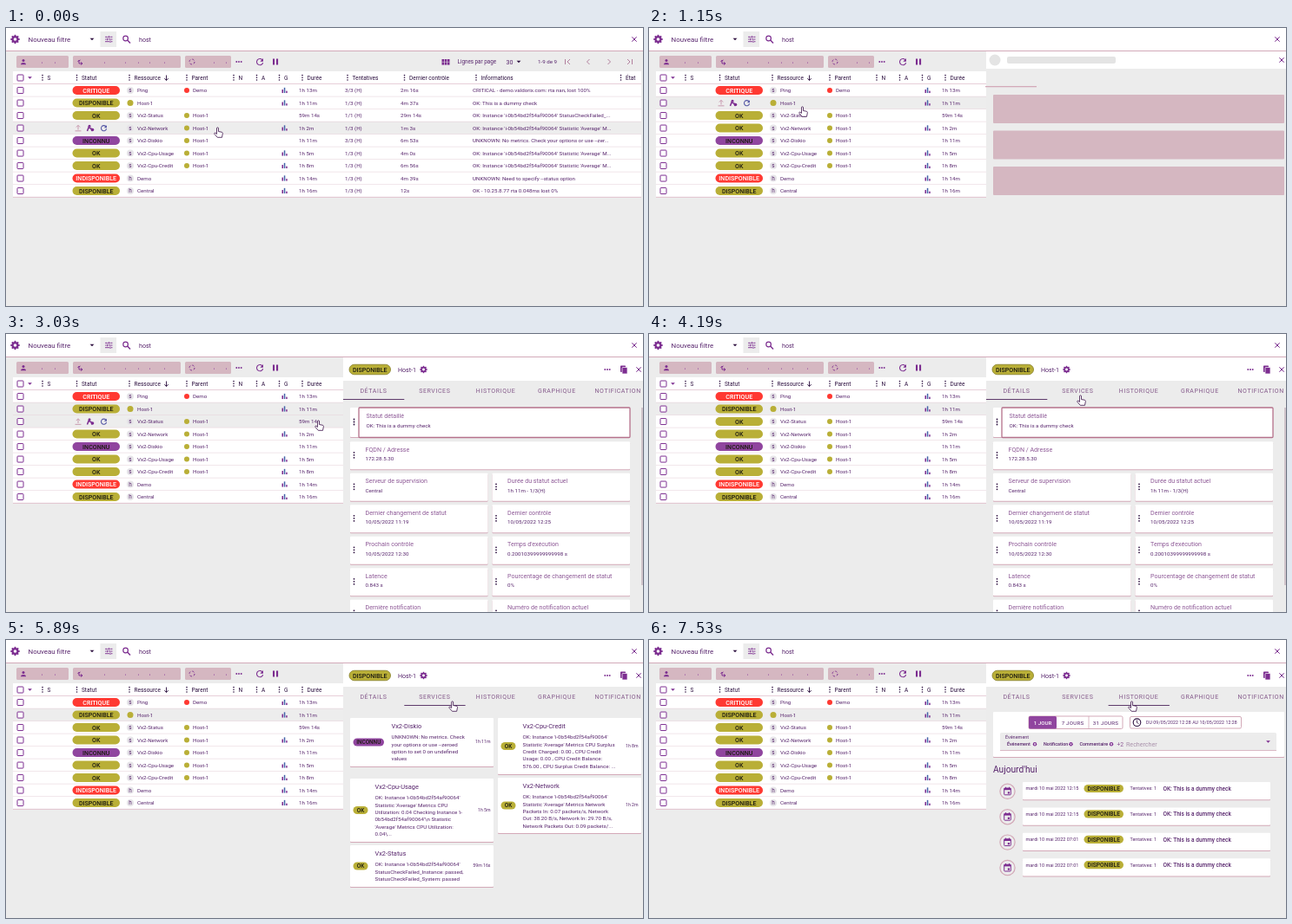
Animation of 733 by 321 pixels, one loop 8000 ms. Source, as an HTML page:

```html
<!DOCTYPE html>
<html lang="fr">
<head>
<meta charset="utf-8">
<title>Supervision</title>
<style>
html, body { margin: 0; width: 100%; height: 100%; overflow: hidden; background: #ececec; }
svg { display: block; width: 100%; height: 100%; font-family: Roboto, Arial, sans-serif; }
text { white-space: pre; }
</style>
</head>
<body>
<svg id="stage" viewBox="0 0 733 321"></svg>
<script>
const INK = '#57246c', DARK = '#2c0f3f', PURPLE = '#7c2d90', VIOLET = '#90459f', SOFT = '#8d5896';
const PINK = '#d5b7c1', LINE = '#d3a9b8', OLIVE = '#b9af37', RED = '#ff3932', GREY = '#ececec', BLACK = '#1c1a10';
const LOOP = 8000, ROW_TOP = 64.8, ROW_H = 14.5, PANEL_X = 388, TAB_W = 70.3;

const esc = s => s.replace(/&/g, '&amp;').replace(/</g, '&lt;');
const text = (x, y, s, size = 6.2, fill = INK, extra = '') =>
  `<text x="${x}" y="${y + size * .355}" font-size="${size}" fill="${fill}" ${extra}>${esc(s)}</text>`;
const mid = (x, y, s, size, fill, extra = '') => text(x, y, s, size, fill, 'text-anchor="middle" ' + extra);
const rect = (x, y, w, h, fill, extra = '') =>
  `<rect x="${x}" y="${y}" width="${w}" height="${h}" fill="${fill}" ${extra}/>`;
const dot = (x, y, r, fill, extra = '') => `<circle cx="${x}" cy="${y}" r="${r}" fill="${fill}" ${extra}/>`;
const path = (d, stroke = PURPLE, w = 1, fill = 'none') =>
  `<path d="${d}" fill="${fill}" stroke="${stroke}" stroke-width="${w}"/>`;
const group = (id, body) => `<g id="${id}">${body}</g>`;
const many = (n, f) => Array.from({ length: n }, (_, i) => f(i)).join('');

// Small icons
const kebab = (x, y, r = .8, gap = 2.7) => many(3, i => dot(x, y + (i - 1) * gap, r, DARK));
const dots = (x, y) => many(3, i => dot(x + (i - 1) * 2.7, y, .95, PURPLE));
const cross = (x, y, r = 2.7, c = PURPLE) => path(`M${x - r} ${y - r}l${2 * r} ${2 * r}m0 ${-2 * r}l${-2 * r} ${2 * r}`, c);
const caret = (x, y, fill = DARK) => path(`M${x - 2.4} ${y - 1.2}h4.8l-2.4 2.5z`, 'none', 0, fill);
const gear = (x, y, r) => dot(x, y, r * .56, 'none', `stroke="${PURPLE}" stroke-width="${r * .42}"`) +
  many(8, i => rect(x - r * .18, y - r, r * .36, r * .4, PURPLE, `transform="rotate(${i * 45} ${x} ${y})"`));
const reload = (x, y, r, c = PURPLE) =>
  path(`M${x + r * .8} ${y - r * .6}A${r} ${r} 0 1 0 ${x + r} ${y + r * .3}`, c, 1.1) +
  path(`M${x + r * 1.1} ${y - r * 1.1}v${r}h${-r}z`, 'none', 0, c);
const bars = (x, y) => rect(x - 3, y - 1, 1.5, 4, PURPLE) + rect(x - .7, y - 3.2, 1.5, 6.2, '#4462a8') + rect(x + 1.7, y + .6, 1.5, 2.4, PURPLE);
const box = (x, y) => rect(x - 3.5, y - 3.5, 7, 7, '#fff', `rx=".8" stroke="${PURPLE}"`);
const pill = (x, y, w, h, s, fill, size, color = BLACK, extra = '') =>
  rect(x, y - h / 2, w, h, fill, `rx="${h / 2}" ${extra}`) + mid(x + w / 2, y, s, size, color, 'font-weight="500"');
const card = (x, y, w, h) => rect(x, y + 1, w, h, LINE, 'rx="1"') + rect(x, y, w, h, '#fff', 'rx="1"');
const blocks = y => many(3, i => rect(396, y + i * 41.5, 335, 33, PINK, 'rx="1"'));

function chrome() {
  const buttons = [[12, 60, [41, 56]], [77, 124, [113, 137, 152, 165, 182]], [206, 53, [239, 253]]];
  return rect(0, 0, 733, 321, GREY) + rect(0, 0, 733, 26, '#fff') + gear(10.5, 13, 5.2) +
    text(25.5, 13, 'Nouveau filtre', 7.9) + caret(99, 13) + rect(108.5, 4, 18.5, 18, GREY) +
    path('M114 10.3h3.5m2 0h3M114 13h1.5m2 0h5M114 15.7h5m2 0h1.5M118.5 9v2.6M116.5 11.7v2.6M120 14.4v2.6', PURPLE, .9) +
    dot(137.6, 12, 2.8, 'none', `stroke="${PURPLE}" stroke-width="1.2"`) +
    path('M139.7 14.1l3.3 3.3', PURPLE, 1.4) + text(153, 13, 'host', 7.1) + cross(723, 13) +
    rect(0, 26, 733, 1, LINE) +
    buttons.map(([x, w, marks]) => rect(x, 32, w, 14, PINK, 'rx="1.5"') +
      marks.map(m => rect(m, 39.6, 1, 1, VIOLET)).join('')).join('') +
    dot(20, 37.4, 1.5, PURPLE) + path('M17 42.3c0-3 6-3 6 0z', 'none', 0, PURPLE) +
    path('M82.5 38.5l3-1.5M84 37v4h4M86 39.5l2 1.5-2 1.5') +
    dot(214, 39, 3, 'none', `stroke="${PURPLE}" stroke-dasharray="2.5 2.2"`) +
    dots(268, 39) + reload(292, 39, 3.6) + rect(307, 35.5, 2.1, 7, PURPLE) + rect(311, 35.5, 2.1, 7, PURPLE) +
    many(3, i => rect(501.5 + i * 3.2, 36, 2.6, 6.6, PURPLE)) + path('M501.5 39.3h9', GREY, .5) +
    text(519.5, 39, 'Lignes par page', 6.3) + text(575.5, 39, '30', 7.1) + caret(590, 39) + text(612, 39, '1-9 de 9') +
    path('M643.5 36v6M649 36l-3 3 3 3M671.5 36l-3 3 3 3M692.5 36l3 3-3 3M715 36l3 3-3 3M720.5 36v6', '#b27f9d');
}

const INST = "OK: Instance 'i-0b54bd2f54af90064'";
const AVG = INST + " Statistic 'Average' M...";
// status, kind, name, parent, duration, tries, last check, info, graph
const ROWS = [
  ['CRITIQUE', 's', 'Ping', 'Demo', '1h 13m', '3/3 (H)', '2m 16s', 'CRITICAL - demo.valdorix.com: rta nan, lost 100%', 1],
  ['DISPONIBLE', '', 'Host-1', '', '1h 11m', '1/3 (H)', '4m 37s', 'OK: This is a dummy check', 1],
  ['OK', 's', 'Vx2-Status', 'Host-1', '59m 14s', '1/1 (H)', '29m 14s', INST + ' StatusCheckFailed_...', 0],
  ['OK', 's', 'Vx2-Network', 'Host-1', '1h 2m', '1/3 (H)', '1m 3s', AVG, 1],
  ['INCONNU', 's', 'Vx2-Diskio', 'Host-1', '1h 11m', '3/3 (H)', '6m 53s', 'UNKNOWN: No metrics. Check your options or use --zer...', 0],
  ['OK', 's', 'Vx2-Cpu-Usage', 'Host-1', '1h 5m', '1/3 (H)', '4m 0s', AVG, 1],
  ['OK', 's', 'Vx2-Cpu-Credit', 'Host-1', '1h 8m', '1/3 (H)', '6m 56s', AVG, 1],
  ['INDISPONIBLE', 'h', 'Demo', '', '1h 14m', '1/3 (H)', '4m 39s', 'UNKNOWN: Need to specify --status option', 1],
  ['DISPONIBLE', 'h', 'Central', '', '1h 16m', '1/3 (H)', '12s', 'OK - 10.25.8.77 rta 0.048ms lost 0%', 1]
];
const STATUS = { CRITIQUE: [RED, '#fff'], INDISPONIBLE: [RED, '#fff'], INCONNU: [VIOLET, BLACK] };
function statusPill(x, y, w, h, s, size) {
  const [fill, color] = STATUS[s] || [OLIVE, BLACK];
  return pill(x, y, w, h, s, fill, size, color);
}

function row(r, i) {
  const [status, kind, name, parent, age, tries, last, info, graph] = r;
  const y = ROW_TOP + ROW_H * (i + .5);
  const actions = path(`M83 ${y + 2}v-5M80.8 ${y - 1}l2.2-2.3 2.2 2.3M79.5 ${y + 3.3}h7`, '#c99bb0') +
    dot(96, y - 2.4, 1.5, PURPLE) + path(`M93.5 ${y + 3.5}l1.5-4 3 1 1 3`, PURPLE, 1.5) + dot(99.5, y + 2, 1.8, PURPLE) +
    reload(112.5, y, 3.1, '#5557a5');
  return rect(8, y - ROW_H / 2, 723, ROW_H, '#fff', `id="bg${i}"`) +
    rect(8, y + ROW_H / 2 - .5, 723, .5, '#e6d3db') + box(16.5, y) +
    group('pill' + i, statusPill(76.5, y, 54.5, 10, status, 7.1)) + group('act' + i, actions) +
    (kind ? dot(143, y, 4, '#e6e4e8') + mid(143, y - .3, kind, 6.4, INK) : dot(143, y, 3.5, OLIVE)) +
    text(151, y, name) +
    (parent ? dot(208, y, 3, parent === 'Demo' ? RED : OLIVE) + text(215, y, parent) : '') +
    (graph ? bars(320.5, y) : '') +
    text(337, y, age) + text(390, y, tries) + text(454, y, last) + text(537, y, info);
}

function table() {
  const heads = [[42, 'S'], [81.5, 'Statut'], [142, 'Ressource'], [208, 'Parent'], [262, 'N'], [288.5, 'A'], [314.5, 'G'],
    [341, 'Durée'], [393, 'Tentatives'], [458.5, 'Dernier contrôle'], [541, 'Informations'], [707.5, 'État']];
  return rect(8, 50, 723, 146, LINE) + rect(8, 50, 723, 14.3, '#fff') + box(16.5, 57.5) + caret(27.5, 57.5, PURPLE) +
    heads.map(([x, s]) => kebab(x, 57.3) + text(x + 5.5, 57.5, s, 6.5, DARK)).join('') +
    path('M184.5 54.5v6M182.3 58.2l2.2 2.3 2.2-2.3', DARK, .9) + ROWS.map(row).join('');
}

function detailCards() {
  const items = [
    ['Serveur de supervision', 'Central', 'Durée du statut actuel', '1h 11m - 1/3(H)'],
    ['Dernier changement de statut', '10/05/2022 11:19', 'Dernier contrôle', '10/05/2022 12:25'],
    ['Prochain contrôle', '10/05/2022 12:30', "Temps d'exécution", '0.20010399999999998 s'],
    ['Latence', '0.843 s', 'Pourcentage de changement de statut', '0%'],
    ['Dernière notification', '', 'Numéro de notification actuel', '']
  ];
  const tile = (x, y, w, title, value) => card(x, y, w, 32) + kebab(x + 4.5, y + 15.5, .9, 3) +
    text(x + 17.5, y + 8.7, title, 7.1, SOFT) + text(x + 17.5, y + 19.5, value);
  return card(396, 85, 322, 34) + kebab(400.5, 101.5, .9, 3) +
    rect(406, 85, 312, 34.5, '#fff', 'stroke="#b5718b" stroke-width="1.3" rx="1"') +
    text(414.5, 94, 'Statut détaillé', 7.1, SOFT) + text(414.5, 106, 'OK: This is a dummy check') +
    tile(396, 124.3, 322, 'FQDN / Adresse', '172.28.5.30') +
    items.map(([a, b, c, d], i) => {
      const y = 160.8 + i * 36.5;
      return tile(396, y, 158.5, a, b) + tile(559.5, y, 158.5, c, d);
    }).join('') + rect(731, 85, 2, 205, '#cfc3ca');
}

function serviceCards() {
  const item = (x, y, h, title, status, age, lines) => {
    const wide = status === 'INCONNU', tx = x + (wide ? 47.5 : 28.5), cy = y + h / 2;
    return card(x, y, 165, h) + text(tx, y + 9.1, title, 7.4) +
      statusPill(x + 3.5, cy, wide ? 35.5 : 17, 9.2, status, 6.4) +
      lines.map((s, i) => text(tx, y + 21.9 + i * 8.4, s)).join('') +
      text(x + 161.5, cy - .5, age, 5.2, INK, 'text-anchor="end"');
  };
  return item(396, 90, 56, 'Vx2-Diskio', 'INCONNU', '1h 11m',
      ['UNKNOWN: No metrics. Check', 'your options or use --zeroed', 'option to set 0 on undefined', 'values']) +
    item(396, 160, 73, 'Vx2-Cpu-Usage', 'OK', '1h 5m', [INST, "Statistic 'Average' Metrics CPU",
      "Utilization: 0.04 Checking Instance 'i-", "0b54bd2f54af90064'\\n Statistic", "'Average' Metrics CPU Utilization:", '0.04\\...']) +
    item(396, 237, 48, 'Vx2-Status', 'OK', '59m 16s',
      [INST, 'StatusCheckFailed_Instance: passed,', 'StatusCheckFailed_System: passed']) +
    item(566, 90, 65, 'Vx2-Cpu-Credit', 'OK', '1h 8m', [INST, "Statistic 'Average' Metrics CPU Surplus",
      'Credit Charged: 0.00 , CPU Credit', 'Usage: 0.00 , CPU Credit Balance:', '576.00 , CPU Surplus Credit Balance: ...']) +
    item(566, 159, 64, 'Vx2-Network', 'OK', '1h 2m', [INST, "Statistic 'Average' Metrics Network",
      'Packets In: 0.07 packets/s, Network', 'Out: 38.20 B/s, Network In: 29.70 B/s,', 'Network Packets Out: 0.09 packets/...']);
}

function historyFilter() {
  const frame = `stroke="${LINE}" rx="1.5"`;
  const chip = (x, s, end) => text(x, 120.3, s, 5.4, INK, 'font-weight="500"') +
    dot(end, 120.3, 2.2, PURPLE) + cross(end, 120.3, .8, '#fff');
  return card(396, 83, 335, 52) + rect(437, 88, 108, 14.5, '#fff', frame) + rect(437, 88, 32, 14.5, VIOLET, 'rx="1.5"') +
    path('M506 88v14.5', LINE, .8) + mid(453, 95.3, '1 JOUR', 6.2, '#fff', 'font-weight="500"') +
    mid(487.5, 95.3, '7 JOURS', 6.2, INK, 'letter-spacing=".2"') + mid(525.5, 95.3, '31 JOURS', 6.2, INK, 'letter-spacing=".2"') +
    rect(553.5, 88.5, 128, 13.5, '#fff', frame) + dot(561.5, 95.2, 4.3, 'none', `stroke="${DARK}" stroke-width="1.1"`) +
    path('M561.5 92.5v3l2 1', DARK, .8) + text(572, 95.3, 'DU 09/05/2022 12:28 AU 10/05/2022 12:28', 5.2, INK, 'letter-spacing=".1"') +
    rect(404, 107, 318, 20.5, GREY, 'rx="1.5"') + rect(404, 127, 318, .8, LINE) + text(410, 111.8, 'Événement', 5.5) +
    chip(412, 'Événement', 444) + chip(454, 'Notification', 485.5) + chip(495.5, 'Commentaire', 532) +
    text(538.5, 120.3, '+2', 6.8, SOFT) + text(549, 120.3, 'Rechercher', 7.1, '#a78fa9') + caret(712.5, 117.5, PURPLE);
}

function historyEvents() {
  return text(396, 149.5, "Aujourd'hui", 10.2) + ['12:15', '12:15', '07:01', '07:01'].map((hour, i) => {
    const y = 174.8 + i * 29.4, cy = y - 3.3;
    return dot(412.5, y, 8.6, GREY, `stroke="${LINE}" stroke-width="1.2"`) +
      rect(408.7, y - 3.8, 7.6, 7.8, 'none', `stroke="${PURPLE}" rx=".8"`) + rect(408.7, y - 3.8, 7.6, 2.2, PURPLE) +
      rect(412.8, y + .5, 2.2, 2.2, PURPLE) + path(`M410.5 ${y - 5}v2m4-2v2`) +
      card(430, y - 10.8, 285, 20.3) + text(433.5, cy, 'mardi 10 mai 2022 ' + hour, 5.5) +
      pill(500.5, cy, 45.5, 9.2, 'DISPONIBLE', OLIVE, 6.7) + text(553.5, cy, 'Tentatives: 1', 5.4) +
      text(591.5, cy, 'OK: This is a dummy check', 6.5, INK, 'font-weight="500"');
  }).join('');
}

function panel() {
  const tabs = ['DÉTAILS', 'SERVICES', 'HISTORIQUE', 'GRAPHIQUE', 'NOTIFICATION'];
  const bar = h => rect(PANEL_X, 27, 345, h, '#fff');
  return rect(PANEL_X, 27, 345, 294, GREY) +
    group('wait', bar(20) + dot(398, 37, 6.5, '#e4e4e4') + rect(412, 33, 125, 8, '#e4e4e4', 'rx="2"') +
      rect(387, 67, 59, 1.3, LINE) + blocks(77) + cross(728, 37)) +
    group('head', bar(27) + pill(395, 41, 47.5, 11.5, 'DISPONIBLE', OLIVE, 7.1, BLACK, 'stroke="#857d24" stroke-width=".8"') +
      text(451, 41, 'Host-1', 7.1) + gear(480.5, 41, 4.2) + dots(692, 41) +
      rect(707, 36.5, 6, 7.5, PURPLE, 'rx=".7"') + rect(709, 38.5, 6, 7.5, PURPLE, 'rx=".7" stroke="#fff" stroke-width=".7"') +
      cross(728, 41) +
      tabs.map((s, i) => mid(423 + i * TAB_W, 66, s, 7, '#84598a', 'letter-spacing=".6"')).join('') +
      rect(PANEL_X, 75, TAB_W, 1, '#5d3a6b', 'id="mark"')) +
    group('details', detailCards()) + group('services', serviceCards()) +
    group('filter', historyFilter()) + group('events', historyEvents()) +
    group('waitTab', blocks(90)) + group('waitEvents', blocks(145));
}

const HAND = 'M-1 .8C-1-.5 1-.5 1 .8V4.5L4.6 5.2C5.8 5.5 6 6.2 5.8 7.2L5 11.3H-.2L-3.6 7.4C-4.2 6.5-3.2 5.8-2.4 6.3L-1 7.4Z';
const stage = document.getElementById('stage');
stage.innerHTML = chrome() + table() + group('panel', panel()) + group('hand', path(HAND, '#3a1048', .8, '#fff'));
const el = {};
stage.querySelectorAll('[id]').forEach(n => el[n.id] = n);

const show = (id, on) => el[id].setAttribute('display', on ? 'inline' : 'none');
const clamp = v => Math.max(0, Math.min(1, v));
const easeOut = p => 1 - (1 - p) ** 3;
const easeBoth = p => p * p * (3 - 2 * p);
const span = (t, a, b, ease = easeBoth) => ease(clamp((t - a) / (b - a)));

// start, end, target of each pointer move
const MOVES = [[70, 540, 176.5, 91], [2550, 3310, 440, 104], [3380, 3800, 496.5, 71], [5620, 6380, 555.5, 71]];
function pointer(t) {
  let x = 243.5, y = 115;
  for (const [a, b, tx, ty] of MOVES) {
    const p = span(t, a, b);
    x += (tx - x) * p;
    y += (ty - y) * p;
  }
  return [x, y];
}

function draw(t) {
  const [x, y] = pointer(t);
  el.hand.setAttribute('transform', `translate(${x} ${y})`);
  const opened = t >= 820;
  const over = x < PANEL_X ? Math.floor((y - ROW_TOP) / ROW_H) : -1;
  ROWS.forEach((_, i) => {
    show('act' + i, i === over);
    show('pill' + i, i !== over);
    el['bg' + i].setAttribute('fill', i === over || (opened && i === 1) ? '#ededed' : '#fff');
  });

  show('panel', opened);
  el.panel.setAttribute('transform', `translate(${345 * (1 - span(t, 820, 1045, easeOut))} 0)`);
  const loaded = t >= 1490;
  show('wait', !loaded);
  show('head', loaded);
  show('details', loaded && t < 4260);
  show('waitTab', t >= 4260 && t < 4600);
  show('services', t >= 4600 && t < 6990);
  show('filter', t >= 6990);
  show('waitEvents', t >= 6990 && t < 7340);
  show('events', t >= 7340);
  const tab = span(t, 4240, 4540) + span(t, 6910, 7210);
  el.mark.setAttribute('x', PANEL_X + tab * TAB_W);
}

const start = performance.now();
function frame() {
  draw((performance.now() - start) % LOOP);
  requestAnimationFrame(frame);
}
draw(0);
requestAnimationFrame(frame);
</script>
</body>
</html>
```
